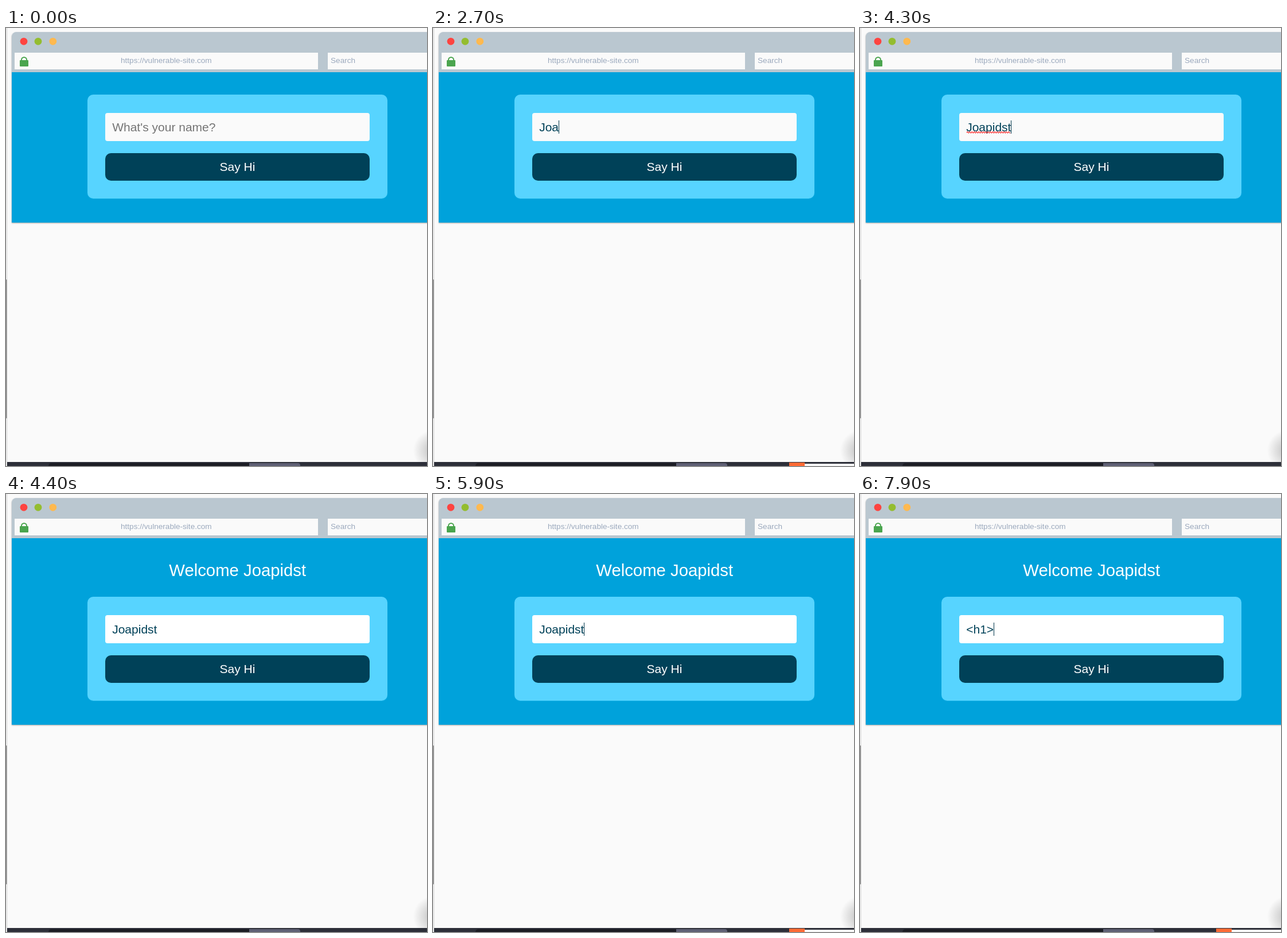
Recreate the animation shown at these times as an HTML page. Size 734x763 px, loop 8 s.

```html
<!DOCTYPE html>
<html lang="en">
<head>
<meta charset="utf-8">
<title>Greeting form</title>
<style>
  html, body { margin: 0; width: 100%; height: 100%; overflow: hidden; background: #fafafa; }
  svg { display: block; }
  text { font-family: "Liberation Sans", Arial, sans-serif; font-size: 21px; white-space: pre; }
  .small { font-size: 13.6px; fill: #9ba9bd; }
  .light { fill: #fff; text-anchor: middle; }
</style>
</head>
<body>
<svg width="734" height="763" viewBox="0 0 734 763">
  <defs>
    <radialGradient id="shade" gradientUnits="userSpaceOnUse" cx="746" cy="736" r="36">
      <stop offset=".3" stop-color="#cfcfcf"/>
      <stop offset="1" stop-color="#fafafa"/>
    </radialGradient>
    <filter id="shadow" x="-5%" y="-5%" width="110%" height="112%">
      <feDropShadow dx="0" dy="1" stdDeviation="1" flood-opacity=".35"/>
    </filter>
  </defs>
  <rect width="734" height="763" fill="#fafafa"/>
  <rect x="710" y="698" width="24" height="58" fill="url(#shade)"/>
  <rect x="1" width="1" height="763" fill="#d0d0d0"/>
  <rect y="438" width="1.5" height="242" rx=".7" fill="#858585"/>

  <!-- browser window -->
  <g filter="url(#shadow)">
    <path d="M10 77V15a8 8 0 0 1 8-8H750V77Z" fill="#bac7d0"/>
    <rect id="banner" x="10" y="77" width="740" height="262" fill="#00a2db"/>
  </g>
  <circle cx="31" cy="23.3" r="6.4" fill="#ff4440"/>
  <circle cx="56" cy="23.3" r="6.4" fill="#94bd2f"/>
  <circle cx="81.8" cy="23.3" r="6.4" fill="#ffb94f"/>
  <path d="M15 43H544V72H15ZM561 43H734V72H561Z" fill="#fafafa"/>
  <rect x="24" y="56" width="15" height="11" rx="1" fill="#4ba54f"/>
  <path d="M27 57V55.5a4.5 4.5 0 0 1 9 0V57" fill="none" stroke="#4ba54f" stroke-width="2"/>
  <text class="small" x="200" y="61">https://vulnerable-site.com</text>
  <text class="small" x="566" y="61">Search</text>

  <!-- greeting -->
  <g id="greeting">
    <rect id="mark" x="406" y="116" height="34" fill="#007fff"/>
    <text class="light" x="403.7" y="143" style="font-size:29.3px">Welcome Joapidst</text>
  </g>

  <!-- form -->
  <g id="form">
    <rect x="142" y="117" width="523" height="181" rx="10" fill="#10aee3"/>
    <rect x="142" y="116" width="523" height="181" rx="10" fill="#57d4ff"/>
    <rect id="field" x="173" y="148" width="461" height="49" rx="4"/>
    <rect id="selection" x="186" y="160" width="78" height="24" fill="#3390ff"/>
    <text id="value" x="185.2" y="179.5"></text>
    <path id="squiggle" fill="none" stroke="#f22" stroke-width="1.1"/>
    <rect id="caret" y="161" width="1" height="23" fill="#00364a"/>
    <rect x="173" y="218" width="461" height="48" rx="10" fill="#004158"/>
    <text class="light" x="403.5" y="249">Say Hi</text>
  </g>

  <!-- taskbar -->
  <rect x="2" y="756" width="732" height="7" fill="#2d2f39"/>
  <path d="M74 763a5 5 0 0 1 5-5H424V763Z" fill="#1c1d24"/>
  <path d="M424 758H509a4 4 0 0 1 4 4V763H424Z" fill="#5f6074"/>
  <g id="popup">
    <rect x="640" y="759" width="94" height="4" fill="#fafafa"/>
    <rect x="621" y="757" width="27" height="27" fill="#ff6b35"/>
  </g>
</svg>
<script>
const LOOP = 8000, NAME = "Joapidst", TAG = "<h1>";
const el = id => document.getElementById(id);
const show = (id, on) => el(id).setAttribute("visibility", on ? "visible" : "hidden");
const set = (id, attr, v) => el(id).setAttribute(attr, v);
const within = (t, from, to) => t >= from && t < to;
const typed = (t, text, times) => text.slice(0, times.filter(at => t >= at).length);
const nameKeys = [2300, 2500, 2700, 2800, 2900, 2900, 3100, 3300];
const tagKeys = [7200, 7500, 7600, 7900];

let wave = "M186 182.5";
for (let i = 0; i < 19; i++) wave += "q1 -3 2 -1t2 1";
set("squiggle", "d", wave);

function draw(t) {
  const greeted = t >= 4400, selected = within(t, 6600, 7200), empty = t < 2300;
  const value = empty ? "What's your name?"
    : t < 7200 ? typed(t, NAME, nameKeys) : typed(t, TAG, tagKeys);

  show("greeting", greeted);
  set("banner", "height", greeted ? 325 : 262);
  set("form", "transform", `translate(0 ${greeted ? 63 : 0})`);
  set("field", "fill", greeted ? "#fff" : "#fafafa");
  set("mark", "width", !within(t, 5400, 5900) ? 0 : t < 5500 ? 23 : 117);

  el("value").textContent = value;
  set("value", "fill", empty ? "#757575" : selected ? "#fff" : "#004158");
  set("selection", "width", selected ? 78 : 0);
  show("squiggle", within(t, 4300, 4400));

  const caretOn = within(t, 700, 1200) || within(t, 1700, 2200) || within(t, 2300, 3800)
    || within(t, 4300, 4400) || within(t, 5900, 6400) || t >= 7200;
  const end = empty ? 186 : 185.2 + el("value").getComputedTextLength();
  set("caret", "x", Math.round(end));
  show("caret", caretOn);
  show("popup", within(t, 700, 4300) || t >= 5900);
}

function tick() {
  draw(performance.now() % LOOP);
  requestAnimationFrame(tick);
}
tick();
</script>
</body>
</html>
```
